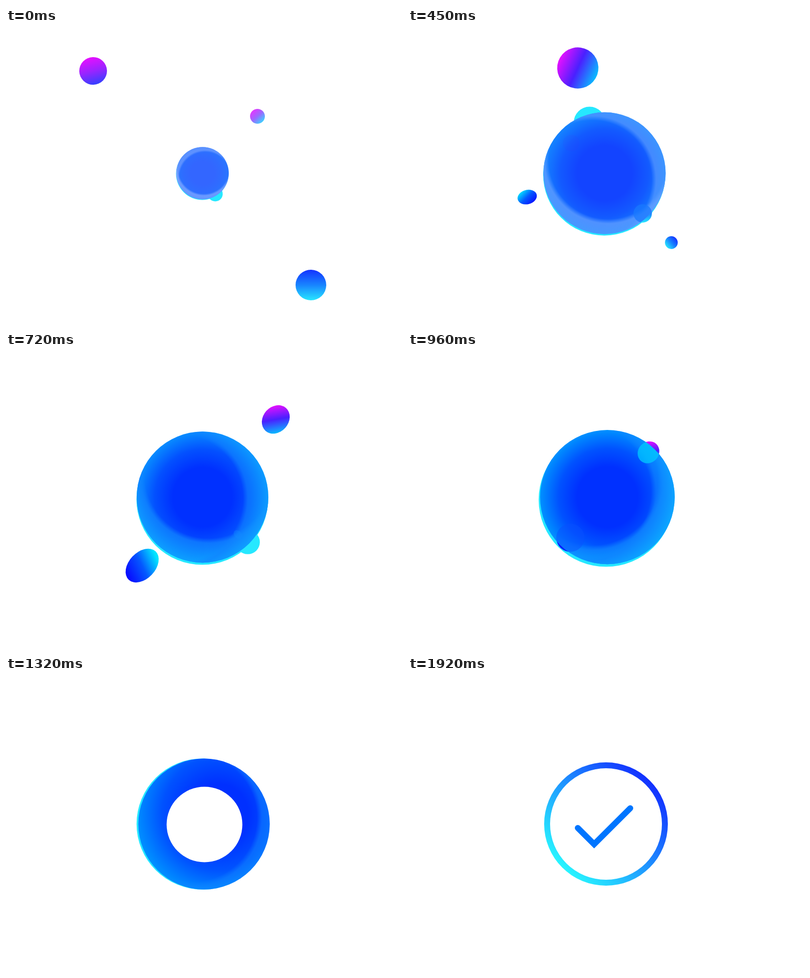
An HTML page with a canvas for the animation above (2.76 s loop, 800x600 px).

```html
<!DOCTYPE html>
<html lang="en">
<head>
<meta charset="utf-8">
<title>Liquid check</title>
<style>
html, body { margin: 0; width: 100%; height: 100%; overflow: hidden; background: #fff; }
canvas { display: block; }
</style>
</head>
<body>
<canvas id="stage" width="800" height="600"></canvas>
<script>
const c = document.getElementById('stage').getContext('2d');
const LOOP = 2760, STEP = 30, CX = 400, CY = 300, PI = Math.PI;
const CYAN = '#26e8ff';
const VIOLET = ['#e60fff', '#9a24ff', '#3440ff'];
const PINK = ['#e610ff', '#4a20ff', '#08bcff'];
const SEA = ['#1433ff', '#1884ff', '#27e6ff'];
const ROYAL = ['#0810ff', '#0458ff', '#00e4ff'];

// Each ball rests at x, y, then falls towards the centre from time go
const ball = (x, y, r, go, pace, tilt, colors, sunk) => ({ x, y, r, go, pace, tilt, colors, sunk });
const BALLS = [
  ball(176, 87, 28, 0, 205, 75, VIOLET, '#4b2de6'),
  ball(616, 521, 31, 0, 235, 90, SEA, '#1978ff'),
  ball(508, 179, 15, 0, 220, 48, ['#e238ff', '#9c68ff', '#3ed0ff'], '#50aaff'),
  ball(165, 363, 22, 350, 210, 225, ROYAL, '#1464ff'),
  ball(343, 81, 42, 500, 180, 25, PINK, '#0c78ff'),
  ball(532, 435, 13, 500, 238, 140, SEA, '#148cff'),
  ball(181, 533, 46, 580, 186, -25, ROYAL, '#0a50ff'),
  ball(574, 104, 33, 662, 290, 80, PINK, '#00c8ff')
];

// Bulges of the cyan under-layer: direction, time of the peak, size
const LOBES = [[58, 0, 15], [-107, 450, 32], [44, 750, 25]];

const clamp = v => Math.max(0, Math.min(1, v));
const ramp = (t, from, to) => clamp((t - from) / (to - from));
const smooth = (t, from, to) => { const p = ramp(t, from, to); return p * p * (3 - 2 * p); };
const easeOut = (p, power) => 1 - (1 - p) ** power;
const mix = (a, b, p) => a + (b - a) * p;
const rad = degrees => degrees * PI / 180;
const blue = (r, g, a = 1) => `rgba(${r},${g},255,${a})`;

function disc(x, y, r, fill) {
  c.beginPath();
  c.arc(x, y, r, 0, PI * 2);
  c.fillStyle = fill;
  c.fill();
}

function linear(x, y, r, degrees, colors) {
  const dx = Math.cos(rad(degrees)) * r, dy = Math.sin(rad(degrees)) * r;
  const g = c.createLinearGradient(x - dx, y - dy, x + dx, y + dy);
  colors.forEach((color, i) => g.addColorStop(i / (colors.length - 1), color));
  return g;
}

const radius = t => 138 - 85 * Math.exp(-t / 255) - 13 * smooth(t, 1110, 1620);

// The body leans up and swings from left to right before it settles
function bodyAt(t) {
  const lean = 6.5 * (1 - smooth(t, 960, 1320));
  const a = rad(mix(-117, -65, smooth(t, 720, 960)));
  return { x: CX + Math.cos(a) * lean, y: CY + Math.sin(a) * lean, r: radius(t) };
}

function drawUnder(t, R) {
  for (const [angle, peak, size] of LOBES) {
    const swell = Math.cos(PI / 2 * clamp(Math.abs(t - peak) / 300)) ** 2;
    const d = R - 10, a = rad(angle);
    disc(CX + Math.cos(a) * d, CY + Math.sin(a) * d, size * swell, CYAN);
  }
  const settle = 1 - smooth(t, 1320, 1620);
  const sway = -3.5 * Math.abs(Math.cos(PI * ramp(t, 720, 1200))) * settle;
  disc(CX + sway, CY + Math.min(0, t / 250 - 4.5), R, CYAN);
}

function drawSheen(t, { x, y, r }, degrees, alpha) {
  const edge = .81 - .18 * Math.sin(PI * ramp(t, 300, 1320)) ** 2;
  const d = (edge - 1) * r, a = rad(degrees), p = smooth(t, 300, 750);
  const ox = x + Math.cos(a) * d, oy = y + Math.sin(a) * d;
  const red = mix(130, 16, p), green = mix(168, 132, p);
  const light = c.createRadialGradient(ox, oy, r * .97, ox, oy, r * 1.35);
  light.addColorStop(0, blue(red, green, 0));
  light.addColorStop(.2, blue(red, green, alpha));
  light.addColorStop(1, blue(red, green + 45 * p, alpha * .7));
  disc(x, y, r, light);
}

function drawBody(t, body) {
  const { x, y, r } = body, p = ramp(t, 0, 720), q = ramp(t, 0, 900);
  const core = [mix(51, 0, p), mix(102, 48, p)], rim = [mix(40, 0, q), mix(118, 145, q)];
  const turn = smooth(t, 1110, 1320);
  const lx = x + .22 * turn * r, ly = y - .16 * turn * r;
  const fill = c.createRadialGradient(lx, ly, r * .45, lx, ly, r * (1 + .27 * turn));
  fill.addColorStop(0, blue(...core));
  fill.addColorStop(.5, blue(mix(core[0], rim[0], .35), mix(core[1], rim[1], .35)));
  fill.addColorStop(1, blue(...rim));
  disc(x, y, r, fill);
  drawSheen(t, body, 105 - 75 * smooth(t, 720, 1080), .75 * (1 - ramp(t, 1200, 1620)));
  drawSheen(t, body, -120 + 145 * Math.sqrt(ramp(t, 0, 1100)), .6 * (1 - ramp(t, 960, 1320)));
}

function pose(b, t) {
  const age = Math.max(0, t - b.go), left = b.pace / (b.pace + age);
  const grown = b.go ? easeOut(ramp(t, b.go - 130, b.go - 30), 3) : 1;
  const along = b.r * grown * Math.max(.6, 1 - age / 1000);
  const across = along * (1 - .33 * Math.sin(PI * clamp(age / 330)));
  return { x: mix(CX, b.x, left), y: mix(CY, b.y, left), along, across };
}

function fillBall(b, { x, y, along, across }, fill) {
  c.beginPath();
  c.ellipse(x, y, along, across, Math.atan2(b.y - CY, b.x - CX), 0, PI * 2);
  c.fillStyle = fill;
  c.fill();
}

function drawBalls(t) {
  for (const b of BALLS) {
    const p = pose(b, t);
    fillBall(b, p, linear(p.x, p.y, (p.along + p.across) / 2, b.tilt, b.colors));
  }
}

// Balls show through the body only near its rim
function drawSunk(t, body) {
  c.save();
  c.beginPath();
  c.arc(body.x, body.y, body.r, 0, PI * 2);
  c.clip();
  for (const b of BALLS) {
    const p = pose(b, t);
    c.globalAlpha = .75 * ramp(Math.hypot(p.x - body.x, p.y - body.y) / body.r, .72, .87);
    fillBall(b, p, b.sunk);
  }
  c.restore();
}

function drawRing(t) {
  c.globalAlpha = ramp(t, 1320, 1680);
  disc(CX, CY, radius(t), linear(CX, CY, 125, -45, ['#28f5ff', '#1e92ff', '#1230ff']));
  c.globalAlpha = 1;
  const shift = 1 - ramp(t, 1320, 1620);
  disc(CX + shift, CY + shift, 113 * easeOut(ramp(t, 1140, 1800), 3.55), '#fff');
}

function drawCheck(t) {
  const drawn = 151 * smooth(t, 1620, 1920);
  if (!drawn) return;
  c.beginPath();
  c.moveTo(343, 308);
  c.lineTo(376, 341);
  c.lineTo(449, 268);
  c.setLineDash([drawn, 300]);
  c.lineWidth = 12;
  c.lineCap = 'round';
  c.strokeStyle = '#0075ff';
  c.stroke();
}

const start = performance.now();
function frame() {
  const t = Math.floor((performance.now() - start) % LOOP / STEP) * STEP;
  c.fillStyle = '#fff';
  c.fillRect(0, 0, 800, 600);
  if (t < 1680) {
    const body = bodyAt(t);
    drawUnder(t, body.r);
    drawBalls(t);
    drawBody(t, body);
    drawSunk(t, body);
  }
  if (t > 1110) drawRing(t);
  drawCheck(t);
  requestAnimationFrame(frame);
}
frame();
</script>
</body>
</html>
```
